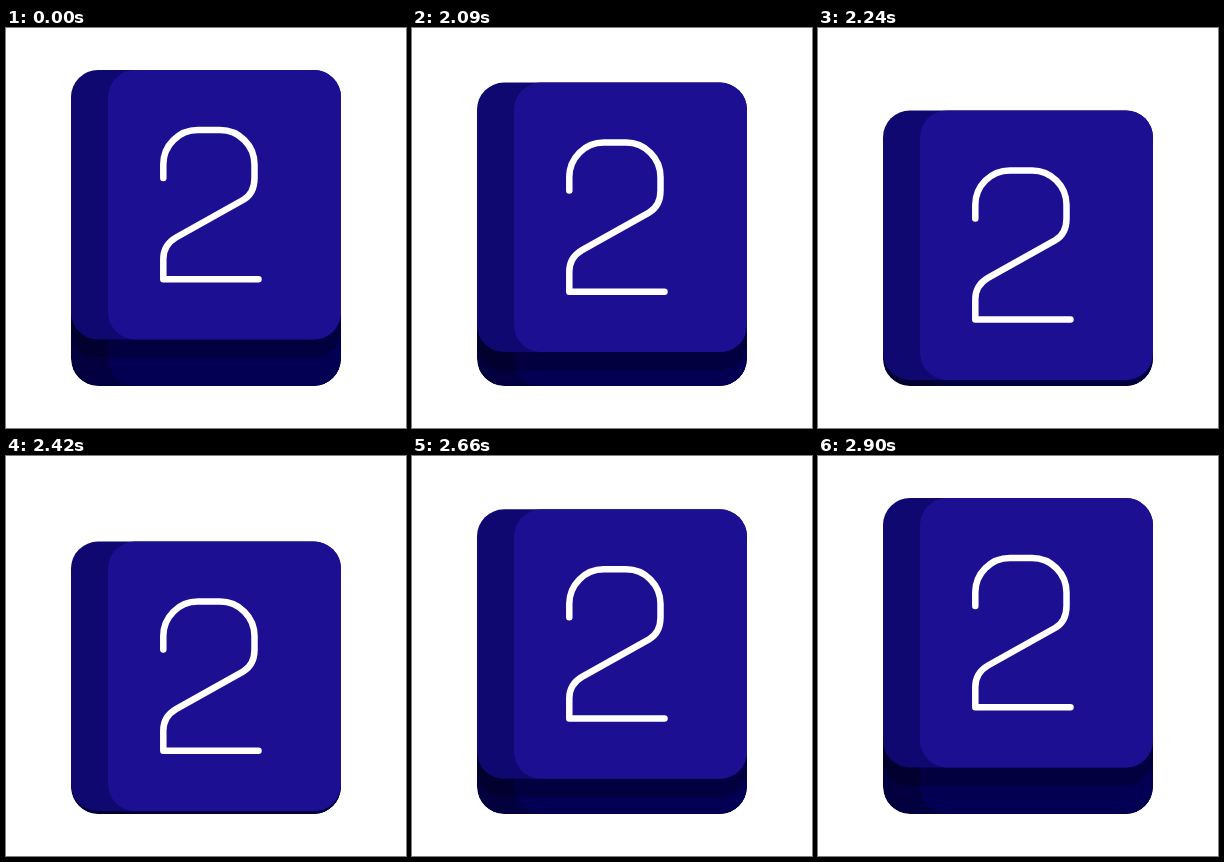
Animation, 400 px wide and 400 px high, one loop 2.93 s. Source, as an HTML page:

```html
<!DOCTYPE html>
<html lang="en">
<head>
<meta charset="utf-8">
<title>Key press</title>
<style>
  html, body { margin: 0; width: 100%; height: 100%; overflow: hidden; background: #fff; }
  svg { display: block; width: 100%; height: 100%; }
</style>
</head>
<body>
<svg viewBox="0 0 400 400">
  <defs>
    <rect id="side" x="65" y="42" width="270" height="269.5" rx="27"/>
    <path id="top" d="M129 42H308A27 27 0 0 1 335 69V284.500A27 27 0 0 1 308 311.500H129A27 27 0 0 1 102 284.500V69A27 27 0 0 1 129 42Z"/>
    <clipPath id="base"><use href="#side" y="46.500"/></clipPath>
  </defs>
  <g clip-path="url(#base)">
    <use href="#side" y="46.500" fill="#02003e"/>
    <use href="#top" y="46.500" fill="#030054"/>
    <g class="moving"><use href="#side" y="18.500" fill="#000" opacity=".26"/></g>
  </g>
  <g class="moving">
    <use href="#side" fill="#0e0870"/>
    <use href="#top" fill="#1c0f92"/>
    <path fill="none" stroke="#fff" stroke-width="6.500" stroke-linecap="round" stroke-linejoin="round"
      d="M157.300 150V136.500A34.500 34.500 0 0 1 191.800 102H214A34.500 34.500 0 0 1 248.500 136.500V150C248.500 160 245 167.500 237 172L170 209.500C161.500 214.500 157.300 221 157.300 231V251.200H252.500"/>
  </g>
</svg>
<script>
  const LOOP = 2930, START = 2000, STEP = 30;
  const DEPTH = 46.5, DOWN = 12, UP = 18; // travel in px, durations in steps
  const moving = document.querySelectorAll('.moving');

  // Cubic Bezier easing with handles (x1, 0) and (x2, 1)
  function ease(u, x1 = 0.25, x2 = 0.43) {
    let lo = 0, hi = 1;
    for (let i = 0; i < 24; i++) {
      const s = (lo + hi) / 2, r = 1 - s;
      if (3 * x1 * s * r * r + 3 * x2 * s * s * r + s ** 3 < u) lo = s;
      else hi = s;
    }
    return lo * lo * (3 - 2 * lo);
  }

  function offset(t) {
    const k = Math.floor((t - START) / STEP);
    if (k <= 0 || k >= DOWN + UP) return 0;
    return DEPTH * (k <= DOWN ? ease(k / DOWN) : 1 - ease((k - DOWN) / UP));
  }

  const begin = performance.now();
  function draw() {
    const y = offset((performance.now() - begin) % LOOP);
    moving.forEach(g => g.setAttribute('transform', `translate(0 ${y.toFixed(2)})`));
    requestAnimationFrame(draw);
  }
  draw();
</script>
</body>
</html>
```
